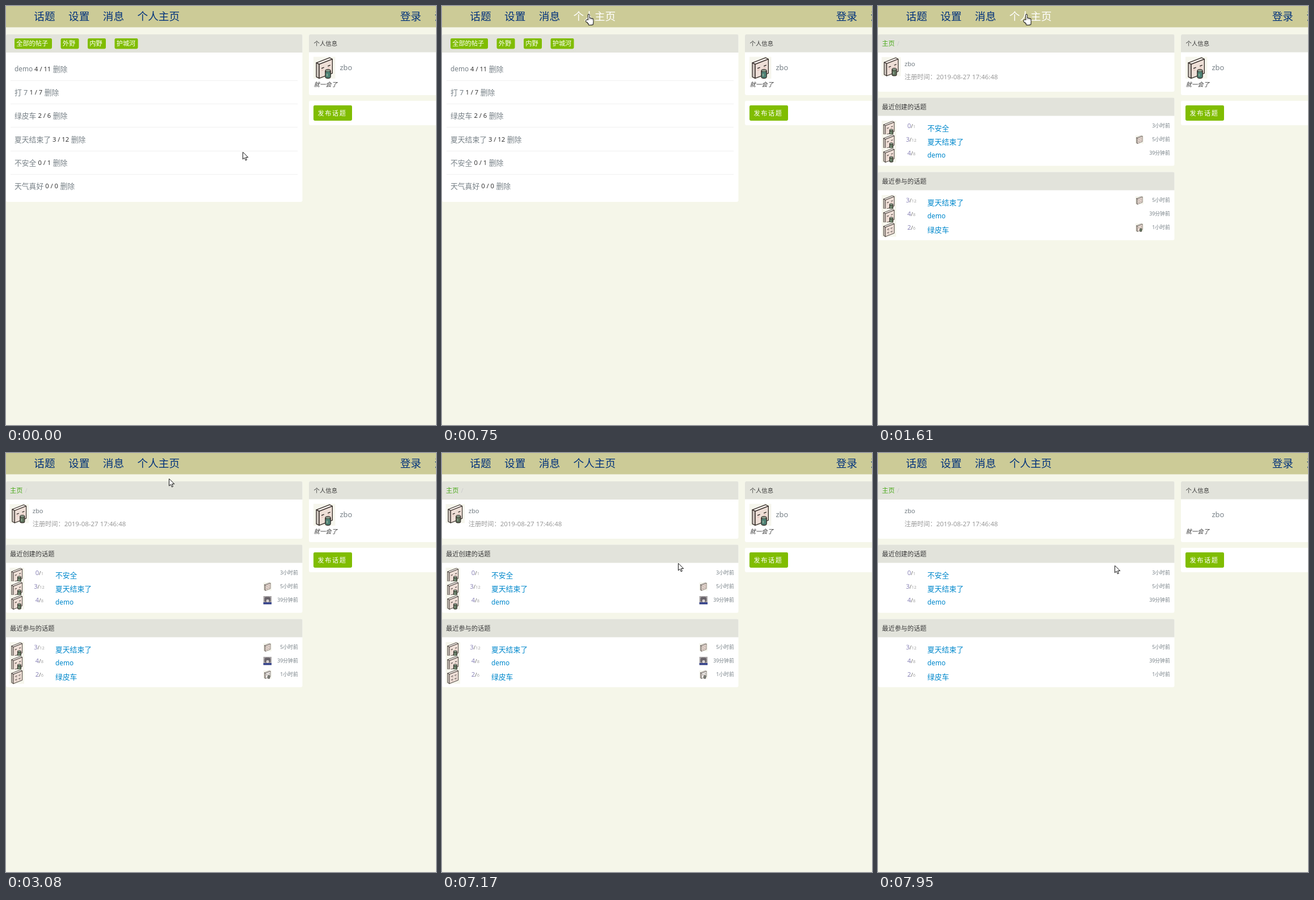
Write an HTML page with a canvas that moves like this. It is 758x738 px and loops after 8000 ms.

```html
<!DOCTYPE html>
<html lang="zh-CN">
<head>
<meta charset="utf-8">
<title>话题</title>
<style>
html, body { margin: 0; width: 100%; height: 100%; overflow: hidden; background: #f5f6e9; }
canvas { display: block; }
</style>
</head>
<body>
<canvas id="stage" width="758" height="738"></canvas>
<script>
const ctx = document.getElementById('stage').getContext('2d');
const LOOP = 8000, OPEN = 1610, LOADED = 1760, RELOAD = 7950;
const FONT = '"Noto Sans", "Noto Sans CJK SC", "Noto Sans CJK", sans-serif';
const NAVY = '#00327c', GREEN = '#80bd01', GREY = '#778087', DARK = '#3c3c3c', BLUE = '#0088cc';
const INK = '#352d29', PAPER = '#f5f6e9';
const USER = 'zbo';
const LINKS = ['话题', '设置', '消息', '个人主页'];
const TABS = ['全部的帖子 ', '外野 ', '内野 ', '护城河'];

// Name, replies, views
const TOPICS = [
  ['demo', 4, 11], ['打 7', 1, 7], ['绿皮车', 2, 6],
  ['夏天结束了', 3, 12], ['不安全', 0, 1], ['天气真好', 0, 0]
];

const SUMMER = { name: '夏天结束了', replies: 3, views: 12, age: '5小时前', owner: 'can', last: 'marks' };
const DEMO = { name: 'demo', replies: 4, views: 8, age: '39分钟前', owner: 'can', last: 'cat' };
const UNSAFE = { name: '不安全', replies: 0, views: 1, age: '3小时前', owner: 'can' };
const TRAIN = { name: '绿皮车', replies: 2, views: 6, age: '1小时前', owner: 'marks', last: 'can' };

// Pointer moves: start, end, x, y
const MOVES = [
  [40, 370, 206, 48], [390, 440, 217, 18], [510, 830, 261, 15],
  [850, 1060, 256, 6], [1080, 1140, 261, 15], [3060, 3300, 415, 193],
  [7120, 7170, 416, 194], [7540, 7630, 417, 198]
];

function pointer(t) {
  let x = 417, y = 257;
  for (const [from, to, nextX, nextY] of MOVES) {
    const p = Math.min(1, Math.max(0, (t - from) / (to - from)));
    const ease = 1 - (1 - p) ** 2;
    x += (nextX - x) * ease;
    y += (nextY - y) * ease;
  }
  return [Math.round(x), Math.round(y)];
}

function rect(x, y, w, h, color, radius = 0) {
  ctx.fillStyle = color;
  ctx.beginPath();
  ctx.roundRect(x, y, w, h, radius);
  ctx.fill();
}

// cy is the middle of a full-width glyph; returns the right edge
function text(str, x, cy, size, color, { align = 'left', style = '', gap = 0 } = {}) {
  ctx.font = `${style} ${size}px ${FONT}`;
  ctx.textAlign = align;
  ctx.letterSpacing = gap + 'px';
  ctx.fillStyle = color;
  ctx.fillText(str, x, cy + size * 0.37);
  return x + ctx.measureText(str).width;
}

function title(str, x, cy, color) {
  return text(str, x, cy, /^[a-z]+$/.test(str) ? 11.8 : 12.8, color);
}

function line(x, y, dx, dy, color, width) {
  ctx.strokeStyle = color;
  ctx.lineWidth = width;
  ctx.beginPath();
  ctx.moveTo(x, y);
  ctx.lineTo(x + dx, y + dy);
  ctx.stroke();
}

// Outlined parallelogram spanned by two vectors
function face(x, y, [ax, ay], [bx, by], fill) {
  ctx.beginPath();
  ctx.moveTo(x, y);
  ctx.lineTo(x + ax, y + ay);
  ctx.lineTo(x + ax + bx, y + ay + by);
  ctx.lineTo(x + bx, y + by);
  ctx.closePath();
  ctx.fillStyle = fill;
  ctx.fill();
  ctx.strokeStyle = INK;
  ctx.lineWidth = 1.3;
  ctx.stroke();
}

function at(x, y, scale, draw) {
  ctx.save();
  ctx.translate(x, y);
  ctx.scale(scale, scale);
  ctx.lineJoin = ctx.lineCap = 'round';
  draw();
  ctx.restore();
}

function can(color) {
  rect(20, 21.5, 10.5, 16.5, INK, 4);
  rect(21.3, 26, 7.9, 10.6, color, 2);
  rect(21.5, 22.8, 7.5, 2.6, '#93a795', 1.3);
  rect(23, 29.5, 2, 4.5, '#91aa96', 1);
}

function carton(x, y, size, kind, canColor = '#5d705a', front = '#eedfd7') {
  at(x, y, size / 38, () => {
    const across = [23, -9], back = [-5, -2.5], down = [0, 24.5];
    rect(0, 0, 38, 38, '#f6f6ed');
    face(10, 13, across, back, '#f7f1ec');
    face(10, 13, back, down, '#d2cac3');
    face(10, 13, across, down, front);
    if (kind === 'marks') {
      for (let i = 0; i < 4; i++) {
        const mx = 15 + (i % 2) * 9, my = 19 + (i >> 1) * 9 - (i % 2) * 3;
        line(mx, my, 4, -2, '#5b5452', 1.6);
        line(mx + 2, my + 2, 2, 0, '#a18f89', 1.3);
      }
      return;
    }
    for (let i = 0; i < 2; i++) {
      line(14.5 + i * 11, 20 - i * 4, 3.4, -1.3, INK, 1.5);
      line(14.5 + i * 11, 23.5 - i * 4, 2, -0.7, '#e6b9b0', 1.3);
    }
    can(canColor);
  });
}

function cat(x, y) {
  rect(x, y, 14.4, 14.4, '#a9a5a6');
  rect(x + 2, y + 1.5, 10.5, 9, '#68636a', 3);
  rect(x + 5, y + 6, 5, 5, '#d9d2d0', 2);
  rect(x, y + 11, 14.4, 3.4, '#34428c');
}

function arrow(x, y) {
  at(x + 0.5, y + 0.5, 1, () => {
    ctx.beginPath();
    [[0, 0], [0, 12.4], [2.9, 9.8], [4.9, 14.4], [6.9, 13.5], [5, 9.1], [8.9, 9.1]]
      .forEach(point => ctx.lineTo(...point));
    ctx.closePath();
    ctx.fillStyle = '#fff';
    ctx.fill();
    ctx.strokeStyle = '#111';
    ctx.stroke();
  });
}

// The black pass is one pixel larger and forms the outline
function hand(x, y) {
  at(x - 5, y, 1, () => {
    for (const [grow, color] of [[1, '#111'], [0, '#fff']]) {
      const part = (px, py, w, h, r) =>
        rect(px - grow, py - grow, w + 2 * grow, h + 2 * grow, color, r + grow);
      for (let i = 0; i < 4; i++) part(4.8 + i * 2.2, i && 5.5 + i * 0.7, 1.8, 10, 0.9);
      part(1.2, 9.5, 3, 4, 1.4);
      part(3.6, 9.5, 9.6, 6, 2);
      part(5.6, 13, 5.8, 5, 0.5);
    }
  });
}

function panel(x, y, w, h, head = 32) {
  rect(x, y, w, h, '#fff', 2.4);
  if (head) rect(x, y, w, head, '#e2e3db', [2.4, 2.4, 0, 0]);
}

// Returns whether the pointer is over a link
function nav(px, py) {
  const size = 18.67, pad = 12;
  let over = false;
  rect(0, 0, 758, 37.6, '#cccb97');
  let x = 49.3;
  for (const label of LINKS) {
    const right = x + label.length * size;
    const hit = py < 37 && px >= x - pad && px < right + pad;
    text(label, x, 18.5, size, hit ? '#fff' : NAVY);
    over ||= hit;
    x = right + 2 * pad - 0.6;
  }
  for (const [i, label] of ['登录', '注销'].entries()) text(label, 694.7 + i * 60.8, 18.5, size, NAVY);
  return over;
}

function sidebar(pictures) {
  panel(534, 50, 230, 107, 31.5);
  text('个人信息', 542.5, 65.7, 10.4, DARK);
  if (pictures) carton(542, 89.5, 38.4, 'can', '#4d8275');
  text(USER, 588.5, 108, 12.8, GREY);
  text('就一会了', 542.5, 138.5, 10.4, '#333', { style: 'italic' });
  panel(534, 167, 230, 43, 0);
  rect(542, 175, 68, 27, GREEN, 2.4);
  text('发布话题', 549.5, 189, 11.2, '#fff', { gap: 1.6 });
}

function topicList() {
  panel(0, 50, 522.5, 295);
  let x = 15;
  for (const label of TABS) {
    ctx.font = `11.2px ${FONT}`;
    ctx.letterSpacing = '0px';
    const w = Math.round(ctx.measureText(label).width + 7);
    rect(x, 57, w, 18.5, GREEN, 2.4);
    text(label, x + 3.2, 66.3, 11.2, '#fff');
    x += w + 15.5;
  }
  TOPICS.forEach(([name, replies, views], i) => {
    const y = 111 + i * 41.3;
    const nameEnd = title(name, 15, y, GREY);
    const countEnd = text(`${replies} / ${views}`, nameEnd + 3, y - 0.4, 11.2, '#333');
    text('删除', countEnd + 3.5, y, 12.8, GREY);
    if (i) rect(8, Math.round(y - 21.5), 506, 1, '#f0f0f0');
  });
}

function counter(replies, views, y) {
  const x = text(String(replies), views > 9 ? 49.2 : 51.7, y, 11.2, '#8b85b8');
  const end = text('/', x, y + 0.8, 9.6, '#666');
  text(String(views), end, y + 1.4, 7.5, '#a5a5a5');
}

function lastPicture(kind, y, loaded) {
  if (kind === 'cat') return loaded && cat(453.7, y);
  const tint = loaded && kind === 'can' ? ['#7d807e', '#ece9e6'] : [];
  carton(453.7, y, 14.4, kind, ...tint);
}

function section(heading, rows, top, pictures, loaded) {
  panel(0, top, 522.5, 120);
  text(heading, 7, top + 16.8, 11.2, DARK);
  rows.forEach((row, i) => {
    const y = top + 53.5 + i * 24;
    if (pictures) {
      carton(6.5, y - 13, 25.5, row.owner);
      if (row.last) lastPicture(row.last, y - 11, loaded);
    }
    counter(row.replies, row.views, y - 4);
    title(row.name, 87, y, BLUE);
    text(row.age, 514.7, y - 4, 8.8, GREY, { align: 'right' });
  });
}

function profile(pictures, loaded) {
  panel(0, 50, 522.5, 101);
  text('主页', 7, 66.3, 11.2, '#4caa1c');
  text('/', 33.5, 66.3, 11.2, '#ccc');
  if (pictures) carton(6.5, 90, 33.5, 'can');
  text(USER, 46.7, 102, 11.2, GREY);
  const x = text('注册时间：', 46.7, 124.7, 11.2, '#999');
  text('2019-08-27 17:46:48', x, 124.7, 11.5, '#999');
  section('最近创建的话题', [UNSAFE, SUMMER, DEMO], 161.5, pictures, loaded);
  section('最近参与的话题', [SUMMER, DEMO, TRAIN], 292.5, pictures, loaded);
}

function render(t) {
  const [x, y] = pointer(t);
  const pictures = t < RELOAD;
  rect(0, 0, 758, 738, PAPER);
  const over = nav(x, y);
  sidebar(pictures);
  if (t < OPEN) topicList();
  else profile(pictures, t >= LOADED);
  (over ? hand : arrow)(x, y);
}

const start = performance.now();
function tick() {
  render((performance.now() - start) % LOOP);
  requestAnimationFrame(tick);
}
tick();
</script>
</body>
</html>
```
